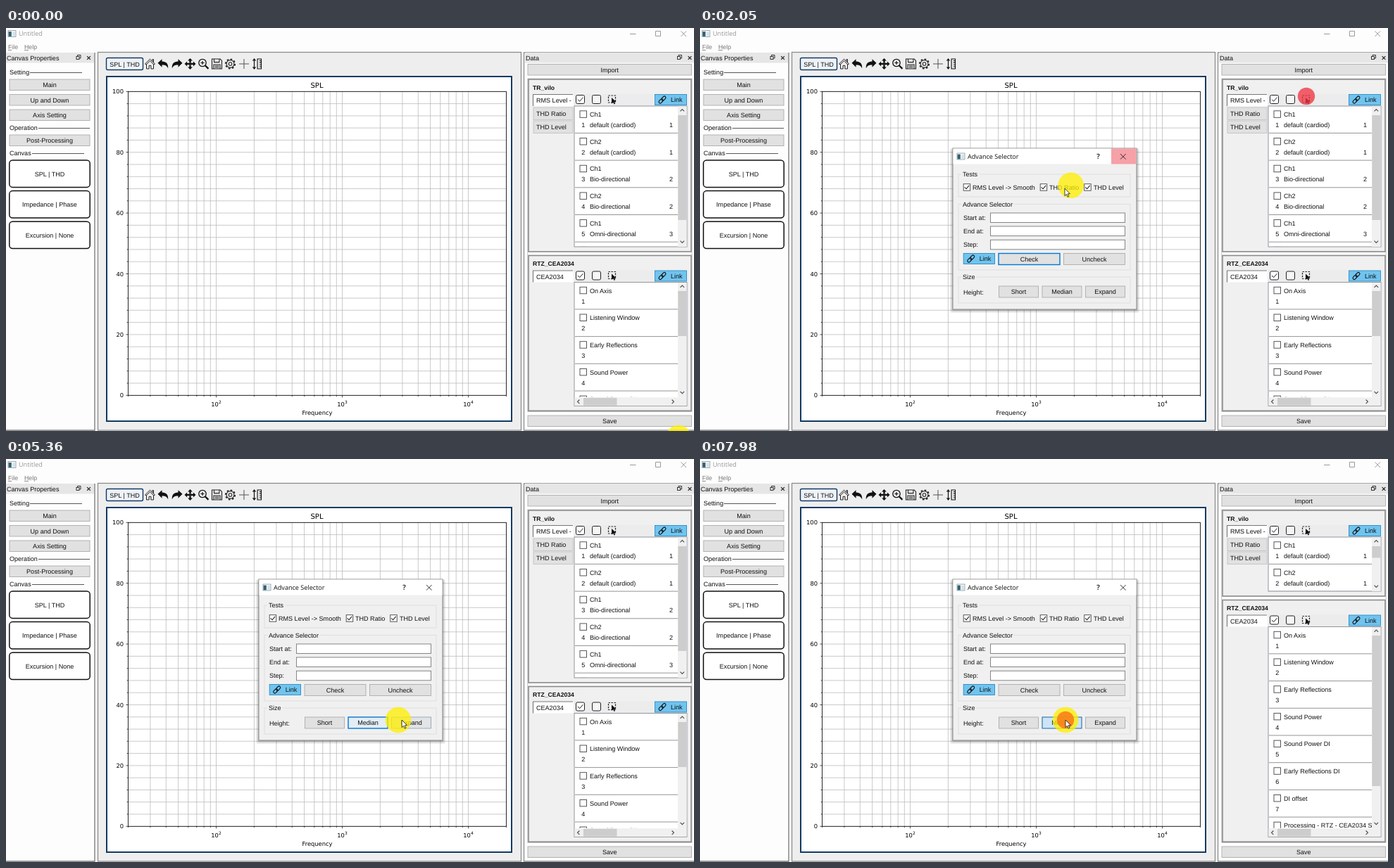
An HTML page that plays this animation: 977 by 573 pixels, repeating every 8000 ms.

```html
<!DOCTYPE html>
<html lang="en">
<head>
<meta charset="utf-8">
<title>Untitled</title>
<style>
html, body { margin: 0; width: 100%; height: 100%; overflow: hidden; background: #fdfdfd; }
svg { display: block; width: 100%; height: 100%; }
text { font: 9.05px "Liberation Sans", Arial, sans-serif; fill: #111; text-rendering: geometricPrecision; white-space: pre; }
.ui { font: 9.1px "Open Sans", sans-serif; }
.menu { fill: #777; font-size: 8.8px; }
.bold { font-weight: bold; font-size: 8.6px; }
.plot { font: 8.35px "DejaVu Sans", sans-serif; fill: #000; }
.mid { text-anchor: middle; }
.end { text-anchor: end; }
</style>
</head>
<body>
<svg id="stage" viewBox="0 0 977 573" preserveAspectRatio="none"></svg>
<script>
const LOOP = 8000;
const stage = document.getElementById('stage');
const INK = '#222', EDGE = '#adadad', FACE = '#e1e1e1', BLUE = '#0078d7';

// ---- drawing helpers, all return SVG markup ----
const rect = (x, y, w, h, fill = 'none', stroke = 'none', sw = 1, more = '') =>
  `<rect x="${x}" y="${y}" width="${w}" height="${h}" fill="${fill}" stroke="${stroke}" stroke-width="${sw}" ${more}/>`;
const box = (x1, y1, x2, y2, fill, stroke, sw, more) => rect(x1, y1, x2 - x1, y2 - y1, fill, stroke, sw, more);
const text = (x, y, s, cls = '', more = '') => `<text x="${x}" y="${y}" class="${cls}" ${more}>${s}</text>`;
const path = (d, stroke = INK, sw = 1, fill = 'none', more = '') =>
  `<path d="${d}" stroke="${stroke}" stroke-width="${sw}" fill="${fill}" ${more}/>`;
const at = (x, y, s, more = '') => `<g transform="translate(${x} ${y}) ${more}">${s}</g>`;
const group = (id, s) => `<g id="${id}">${s}</g>`;

const button = (x1, y1, x2, y2, label, id = '') =>
  box(x1 + .5, y1 + .5, x2 - .5, y2 - .5, FACE, EDGE, .9, id && `id="${id}"`) +
  text((x1 + x2) / 2, (y1 + y2) / 2 + 3.3, label, 'mid');

const cross = (x, y, r, c = INK, w = 1) =>
  path(`M${x - r} ${y - r}L${x + r} ${y + r}M${x + r} ${y - r}L${x - r} ${y + r}`, c, w);
const tick = (x, y) => path(`M${x + 2} ${y + 5.2}l2.4 2.4 4-5`, INK, 1.1);
const check = (x, y, on) => rect(x + .5, y + .5, 9.5, 9.5, '#fff', '#444', .9) + (on ? tick(x, y) : '');

const CHEVRON = { u: 'M-2.8 1.4L0-1.4 2.8 1.4', d: 'M-2.8-1.4L0 1.4 2.8-1.4', l: 'M1.4-2.8L-1.4 0 1.4 2.8', r: 'M-1.4-2.8L1.4 0-1.4 2.8' };
const chevron = (x, y, dir, c = '#505050') => at(x, y, path(CHEVRON[dir], c, 1.2));

const appIcon = (x, y) =>
  rect(x, y, 11, 9, '#f4f8fa', '#8a9aa2', .8) + rect(x + .6, y + 1.6, 4.2, 6.8, '#33606e') + rect(x + 6, y + 2, 4, 6, '#d5e3e8');

const linkButton = (x1, y1, x2) => box(x1 + .5, y1 + .5, x2 - .5, y1 + 15.5, '#70c4ef', '#2b8cc4', .9) +
  at(x1 + 11, y1 + 8, rect(-6.2, -2, 7, 4, 'none', '#111', 1.1, 'rx="2"') + rect(-.8, -2, 7, 4, 'none', '#111', 1.1, 'rx="2"'), 'rotate(-45)') +
  text(x1 + 23, y1 + 11.3, 'Link');

const dockTitle = (x1, x2, label) => box(x1, 35, x2, 49.5, '#e6e6e6') + text(x1 + 1, 46, label) +
  rect(x2 - 25, 40.5, 4, 4, 'none', INK, .9) + path(`M${x2 - 23.5} 40V38.5h4.5v4.5h-1.6`, INK, .9) + cross(x2 - 7.5, 42.5, 2.4, INK, 1.2);

// ---- static window parts ----
function frame() {
  return box(0, 0, 977, 573, '#fdfdfd') + appIcon(3, 3.5) +
    group('caption', text(18, 11, 'Untitled', 'ui', 'style="fill:inherit"') +
      '<path d="M886 8.5h8.5M922.5 4.5h7v7h-7zM958.5 4.5l7.5 7.5m0-7.5l-7.5 7.5" fill="none" stroke="currentColor"/>') +
    text(3, 30, 'File', 'menu') + text(26, 30, 'Help', 'menu') + path('M3 31.5h5M26 31.5h6', '#777', .8);
}

function leftDock() {
  const heading = (y, s, a, b) => text(5, y, s) + path(`M${a} ${y - 2.5}H${b}`, '#444', .9);
  let s = dockTitle(0, 125, 'Canvas Properties') + path('M126 35V572H0', '#777', 1.3) +
    heading(66, 'Setting', 34, 108) + heading(145, 'Operation', 46, 119) + heading(181, 'Canvas', 37, 111) +
    button(4.5, 72.5, 119.5, 89, 'Main') + button(4.5, 94, 119.5, 110.5, 'Up and Down') +
    button(4.5, 115.5, 119.5, 132, 'Axis Setting') + button(4.5, 151.5, 119.5, 168, 'Post-Processing');
  ['SPL | THD', 'Impedance | Phase', 'Excursion | None'].forEach((name, i) => {
    const y = 188 + i * 43.6;
    s += rect(4.8, y, 114.4, 38.4, '#fff', '#111', 1.5, 'rx="4.5"') + text(62, y + 22.7, name, 'mid');
  });
  return s;
}

function toolbar() {
  const undo = 'M-8-1.2L-2-6.8V-3.6C4-3.6 7.4-.2 6.6 6.4 4.8 2.6 2.4 1.4-2 1.6V4.8z';
  const arm = 'M0-8l3.4 3.6H1.2v3h-2.4v-3h-2.2z';
  const move = [0, 90, 180, 270].map(a => `<path d="${arm}" transform="rotate(${a})"/>`).join('');
  return box(142.5, 42.5, 194.5, 59.5, '#eef2f7', '#123a63', 1.4, 'rx="2"') + text(168.5, 54.5, 'SPL | THD', 'mid') +
    at(204.5, 51, path('M-7 0L0-6.8 7 0 5.4 1 0-4.2-5.4 1zM-5 .8V7h3.6V2.4h2.8V7H5V.8M3.4-3.6V-6.4H5V-2', INK, 1)) +
    at(223.5, 51, path(undo, 'none', 0, '#111')) + at(242.5, 51, path(undo, 'none', 0, '#111'), 'scale(-1 1)') +
    at(261.5, 51, `<g fill="#111">${move}${rect(-1.5, -1.5, 3, 3, '#111')}</g>`) +
    at(280, 50.5, '<circle cx="-1" cy="-1" r="5.2" fill="none" stroke="#111" stroke-width="1.3"/>' +
      path('M-3.6-1h5.2M-1-3.6v5.2', '#111', 1.2) + path('M3 3l4.4 4.4', '#111', 2.2)) +
    at(299.5, 51, path('M-7-7H4.6L7-4.6V7H-7zM-4-7v4.6H3.4V-7M-4.6 7V1H4.6v6M-3 3h6M-3 5h6', INK, 1.1)) +
    at(318.5, 51, `<circle r="5.4" fill="none" stroke="${INK}" stroke-width="1.1"/><circle r="6.7" fill="none" stroke="${INK}" stroke-width="1.8" stroke-dasharray="2.6 2.66"/><circle r="2.3" fill="none" stroke="${INK}" stroke-width="1.1"/>`) +
    at(338, 51, path('M-7 0H7M0-7V7', '#555', 1)) +
    at(356.5, 51, path('M-4-6V6M-6-4.4L-4-7-2-4.4M-6 4.4L-4 7-2 4.4', '#111', 1.2) +
      path('M.6-7H6V7H.6zM3.4-4.4H6M3.4-1.6H6M3.4 1.2H6M3.4 4H6', '#111', 1.1));
}

function plot() {
  const L = 173.4, Rt = 710.6, top = 90.3, bot = 522.3;
  const px = f => 298.5 + 179 * (Math.log10(f) - 2);
  const py = v => bot - (bot - top) * v / 100;
  let grid = '', ticks = '', labels = '';
  for (let e = 1; e <= 4; e++) for (let k = 1; k < 10; k++) {
    const f = k * 10 ** e;
    if (f < 20 || f > 20000) continue;
    const x = px(f).toFixed(1);
    grid += `M${x} ${top}V${bot}`;
    ticks += `M${x} ${bot}v${k === 1 ? 3 : 1.8}`;
    if (k === 1) labels += text(x, 537.5, `10<tspan dy="-3.4" font-size="5.9">${e}</tspan>`, 'plot mid');
  }
  for (let v = 0; v <= 100; v += 4) {
    const y = py(v).toFixed(1), major = v % 20 === 0;
    grid += `M${L} ${y}H${Rt}`;
    ticks += `M${L} ${y}h${major ? -3 : -1.8}`;
    if (major) labels += text(167, +y + 3.1, v, 'plot end');
  }
  return box(130.5, 34.5, 731.5, 572, '#eeeeee', '#8c8c8c', 1.3) + toolbar() +
    box(143, 69, 718, 559, '#fff', '#123a63', 2) + path(grid, '#b4b4b4', .7) +
    path(ticks, '#000', .7) + box(L, top, Rt, bot, 'none', '#000', .8) + labels +
    text(441.5, 84.5, 'SPL', 'plot mid', 'style="font-size:10px"') + text(442, 550, 'Frequency', 'plot mid');
}

// ---- data panels ----
const MODES = ['default (cardiod)', 'Bio-directional', 'Omni-directional'];
const micRows = [0, 1, 2, 3, 4, 5].map(i => ({ top: `Ch${i % 2 + 1}`, sub: MODES[i >> 1], side: (i >> 1) + 1 }));
const curveRows = ['On Axis', 'Listening Window', 'Early Reflections', 'Sound Power', 'Sound Power DI',
  'Early Reflections DI', 'DI offset', 'Processing - RTZ - CEA2034 S'].map(top => ({ top }));
const MIC = { title: 'TR_vilo', tabs: ['RMS Level -', 'THD Ratio', 'THD Level'], rows: micRows };
const CURVE = { title: 'RTZ_CEA2034', tabs: ['CEA2034'], rows: curveRows, wide: true };
let clips = 0;

// y: panel top, end: panel bottom, right: panel right edge, thumb: scroll handle span
function panel({ title, tabs, rows, wide }, y, end, thumb, right = 973) {
  const R = right - 6, bar = R - 13, d = y - 73, listTop = d + 111, listEnd = end - 7;
  const rowsEnd = wide ? listEnd - 12 : listEnd, id = 'clip' + clips++;
  let s = box(742, y, right, end, '#f0f0f0', '#8a8a8a', 1.6) + text(748, d + 87.5, title, 'bold');
  s += box(806, d + 94, right - 52, d + 110, '#ececec');
  tabs.forEach((name, i) => {
    const ty = d + 94 + i * 19;
    s += i ? box(749, ty, 805, ty + 17.5, FACE, '#c4c4c4', .9) :
      box(748.5, ty, 806, ty + 17, '#fff') + path(`M748.5 ${ty + 17}V${ty + .5}H805`, '#777', 1.1);
    s += text(753, ty + 12.3, name);
  });
  s += rect(809.5, d + 95.5, 12, 12, '#fff', INK, 1, 'rx="2"') + path(`M812 ${d + 101.5}l2.6 2.8 4.8-5.6`, INK, 1) +
    rect(832.5, d + 95.5, 12, 12, '#f6f6f6', INK, 1, 'rx="2"') +
    rect(855.5, d + 96, 10, 10, 'none', INK, 1.2, 'stroke-dasharray="2.4 1.6"') +
    path(`M860 ${d + 99}v8.6l2.2-1.8 1.4 2.8 1.4-.8-1.3-2.6 2.8-.3z`, 'none', 0, '#111') +
    linkButton(R - 46, d + 94, R);
  s += box(807, listTop, R, listEnd, '#fff', '#8f949b', 1);
  let list = '';
  rows.forEach((row, i) => {
    const ry = listTop + i * 38.7;
    list += check(814.5, ry + 6.3) + text(829, ry + 15, row.top) + text(819.7, ry + 30, i + 1, 'mid') +
      (row.sub ? text(829, ry + 30, row.sub) + text(bar - 9.5, ry + 30, row.side, 'mid') : '') +
      path(`M808 ${ry + 38.4}H${bar}`, '#8a8a8a', .9);
  });
  s += `<clipPath id="${id}">${box(807.5, listTop + .5, bar, rowsEnd - .5, '#000')}</clipPath><g clip-path="url(#${id})">${list}</g>`;
  s += box(bar, listTop + .5, R - .5, rowsEnd, thumb ? '#f0f0f0' : '#f7f7f7');
  const tone = thumb ? '#505050' : '#c2c2c2', cx = bar + 6.3;
  s += chevron(cx, listTop + 6, 'u', tone) + chevron(cx, rowsEnd - 7, 'd', tone);
  if (thumb) s += box(bar + .3, thumb[0], R - .6, thumb[1], '#cdcdcd');
  if (wide) s += box(807.5, rowsEnd, R - .5, listEnd - .5, '#f0f0f0') + box(820, rowsEnd + .5, 867.5, listEnd - .8, '#cdcdcd') +
    chevron(813, rowsEnd + 6, 'l') + chevron(947, rowsEnd + 6, 'r');
  return s;
}

function rightDock() {
  const grown = panel(MIC, 73, 533, null, 960) +
    path('M742 545V539H960V545', '#8a8a8a', 1.6, '#f0f0f0') + box(961, 73, 973.5, 545, '#f0f0f0') +
    box(961.3, 86, 973.3, 408, '#cdcdcd') + chevron(967.3, 79, 'u') + chevron(967.3, 538, 'd');
  return path('M977 35H735.5V572H977', '#8c8c8c', 1.3) + dockTitle(737, 978.5, 'Data') +
    button(740.5, 51, 974, 67.5, 'Import') + button(740.5, 550.5, 974, 567, 'Save') + box(740.8, 72, 974, 545.5, 'none', '#b5b5b5', .8) +
    group('median', panel(MIC, 73, 318, [124, 273]) + panel(CURVE, 323.5, 544.3, [374, 438])) +
    group('short', panel(MIC, 73, 195, [124, 140.5]) + panel(CURVE, 200.5, 544.3, [251, 465])) +
    group('expand', grown);
}

function dialog() {
  const section = (y1, y2, label, w) => box(367, y1, 611, y2, 'none', '#dcdcdc', .9) + box(371, y1 - 2, 373 + w, y1 + 2, '#f0f0f0') +
    text(373, y1 + 3.2, label);
  const field = (y, label) => text(374, y + 10.3, label) + rect(412.5, y + .5, 191, 13.5, '#fff', '#7a7a7a', .9);
  let shade = '';
  for (let i = 6; i > 0; i--) shade += rect(359 - i * .7, 173 - i * .4, 261 + i * 1.4, 228 + i * 1.1, '#000', 'none', 0, 'rx="3" opacity=".045"');
  return shade + box(359, 171, 620, 400, '#f0f0f0', '#7c7c7c', .9) + box(359.5, 171.5, 619.5, 193.5, '#fff') +
    appIcon(365, 178) + text(380, 186, 'Advance Selector', 'ui') + text(565.5, 186.3, '?', 'ui mid', 'style="font-size:10px;font-weight:600"') +
    box(584, 171.5, 619.5, 193.5, '#e81123', 'none', 0, 'id="closeHot"') + cross(600.8, 182.8, 3.8, INK, .9) +
    section(208, 240, 'Tests', 24) + section(250.5, 344, 'Advance Selector', 72) + section(354, 391, 'Size', 20) +
    check(373.7, 221.2, 1) + text(387, 230, 'RMS Level -&gt; Smooth') + check(482.7, 221.2, 1) + text(496, 230, 'THD Ratio') +
    check(545.2, 221.2, 1) + text(559, 230, 'THD Level') +
    field(262.5, 'Start at:') + field(281.5, 'End at:') + field(300.8, 'Step:') + linkButton(373.7, 320, 419) +
    button(423.5, 320, 511.5, 337, 'Check', 'bCheck') + button(516, 320, 604, 337, 'Uncheck') + text(374, 379, 'Height:') +
    button(424, 366.5, 481, 383.5, 'Short', 'bShort') + button(485.5, 366.5, 542.5, 383.5, 'Median', 'bMedian') +
    button(547, 366.5, 604, 383.5, 'Expand', 'bExpand');
}

const pointer = '<circle id="halo" r="18.3" fill="#fff000" opacity=".76"/><circle id="press" r="12.2"/>' +
  group('arrow', path('M0 0V10.6L2.5 8.3 4.2 12.2 5.9 11.4 4.2 7.7H7.5z', '#111', .8, '#fff'));

stage.innerHTML = frame() + leftDock() + plot() + rightDock() + group('dialog', dialog()) + pointer;

// ---- timeline ----
const PATH = [
  [0, 955, 583], [70, 955, 583], [280, 943, 585], [460, 943, 583], [560, 935, 520], [800, 884, 215], [940, 863, 112], [1030, 861, 97.5],
  [1540, 861, 97.5], [1680, 790, 118], [1900, 600, 188], [2050, 518, 228], [2170, 511, 234], [2370, 511, 234],
  [2520, 492, 272], [2760, 444, 350], [2900, 431, 375], [3060, 441, 374], [3940, 441, 374], [4060, 473, 371],
  [4150, 494, 369], [4300, 507, 372], [5150, 507, 372], [5220, 518, 372], [5360, 562, 371], [5480, 573, 373],
  [6370, 573, 373], [6440, 550, 376], [6580, 497, 378], [6760, 456, 377], [7000, 446, 376],
  [7450, 446, 376], [7600, 482, 373], [7780, 514, 371], [7860, 519, 371], [8000, 519, 371]];
const LAYOUT = [[0, 'median'], [3420, 'short'], [4560, 'median'], [5760, 'expand'], [7330, 'short']];
const FOCUS = [[0, 'Check'], [3260, 'Short'], [4400, 'Median'], [5600, 'Expand'], [7180, 'Short'], [7930, 'Median']];
const PRESS = [[1360, 2110, 861, 97], [3260, 3420], [4400, 4560], [5600, 5760], [7180, 7330], [7930, 8000]];
const HOT = { Check: [424, 320, 511], Short: [424, 367, 480], Median: [486, 367, 542], Expand: [547, 367, 603] };

const $ = id => document.getElementById(id);
const clamp = v => Math.max(0, Math.min(1, v));
const latest = (table, t) => table.filter(r => r[0] <= t).pop()[1];
const show = (el, on) => el.setAttribute('visibility', on ? 'visible' : 'hidden');
const place = (el, [x, y]) => el.setAttribute('transform', `translate(${x.toFixed(2)} ${y.toFixed(2)})`);
const mix = (a, b, k) => `rgb(${a.map((v, i) => Math.round(v + (b[i] - v) * k))})`;

function where(t) {
  t = Math.max(0, t);
  const i = Math.max(1, PATH.findIndex(p => p[0] >= t));
  const [t0, x0, y0] = PATH[i - 1], [t1, x1, y1] = PATH[i];
  const k = clamp((t - t0) / (t1 - t0));
  return [x0 + (x1 - x0) * k, y0 + (y1 - y0) * k];
}

// share of the last 300 ms spent over the button gives the slow hover fade
function heat([x1, y1, x2], t) {
  let n = 0;
  for (let i = 0; i < 12; i++) {
    const [x, y] = where(t - i * 25);
    if (x >= x1 && x <= x2 && y >= y1 && y <= y1 + 16) n++;
  }
  return n / 12;
}

function draw(t) {
  const spot = where(t), lag = where(t - 17);
  place($('arrow'), spot);
  place($('halo'), lag);

  const hit = PRESS.find(p => t >= p[0] && t < p[1]);
  show($('press'), hit);
  if (hit) {
    const pos = hit[2] ? [hit[2], hit[3]] : lag;
    const over = Math.hypot(pos[0] - lag[0], pos[1] - lag[1]) < 18;
    place($('press'), pos);
    $('press').setAttribute('fill', over ? '#f97a16' : '#ee3442');
    $('press').setAttribute('opacity', over ? .86 : .78);
  }

  const mode = latest(LAYOUT, t), focus = latest(FOCUS, t);
  for (const id of ['median', 'short', 'expand']) show($(id), id === mode);
  show($('dialog'), t >= 1500);
  $('closeHot').setAttribute('opacity', t < 1870 ? 0 : clamp((2130 - t) / 200));

  const tint = t >= 1360 && t < 1500 ? '#111' : '#999';
  $('caption').style.color = $('caption').style.fill = tint;

  for (const name in HOT) {
    const el = $('b' + name), k = heat(HOT[name], t), own = name === focus;
    const down = own && hit && !hit[2];
    el.setAttribute('fill', down ? '#cce4f7' : mix([225, 225, 225], [229, 241, 251], k));
    el.setAttribute('stroke', down ? '#005499' : own ? BLUE : mix([173, 173, 173], [0, 120, 215], k));
    el.setAttribute('stroke-width', own && !down ? 1.4 : .9);
  }
}

function tickFrame() {
  draw(performance.now() % LOOP);
  requestAnimationFrame(tickFrame);
}
tickFrame();
</script>
</body>
</html>
```
